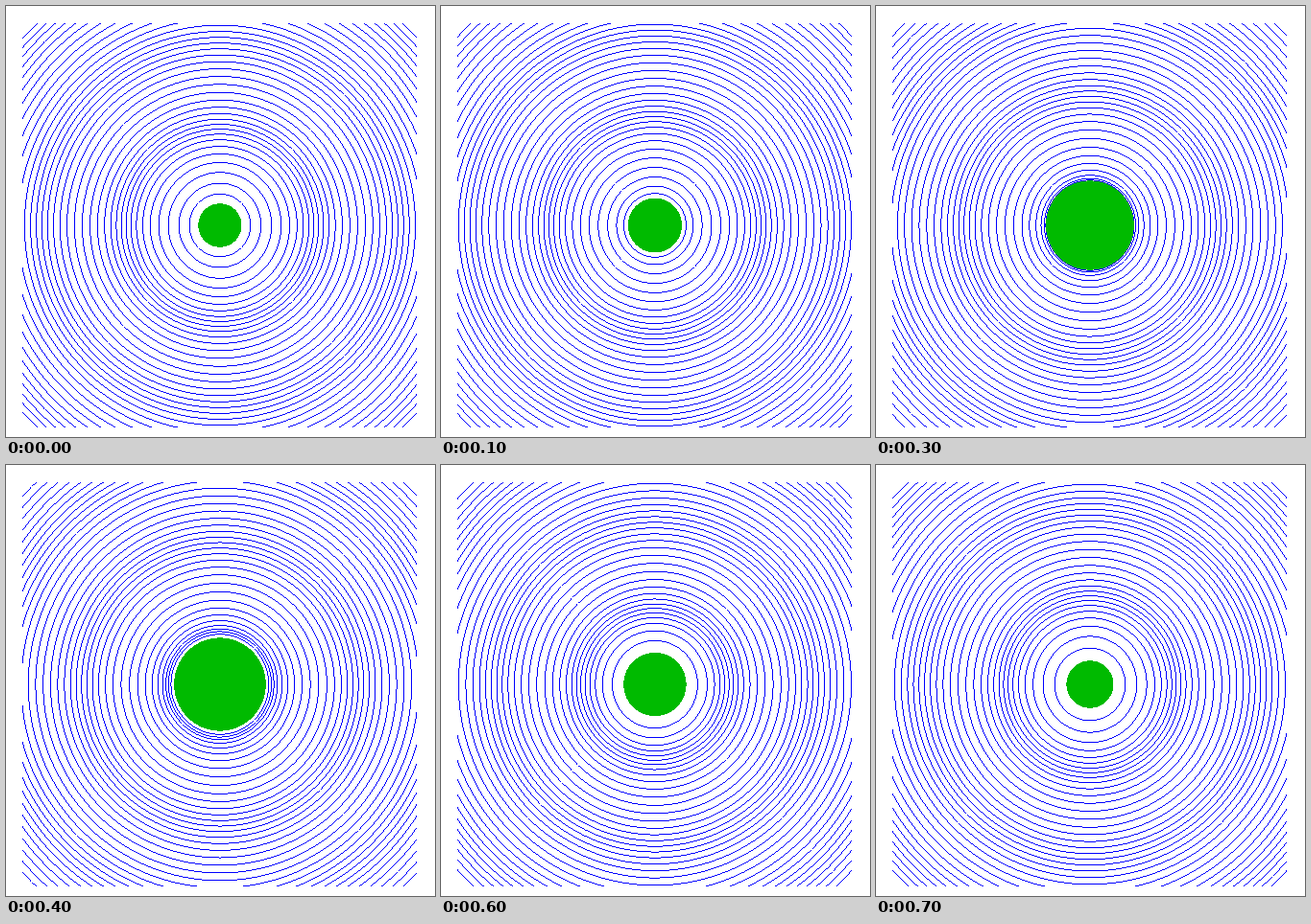
An HTML page with a canvas that plays this animation: 447x450 px, repeating every 0.8 s.

```html
<!DOCTYPE html>
<html lang="en">
<head>
<meta charset="utf-8">
<title>Waves around a pulsating sphere</title>
<style>
  html, body { margin: 0; width: 100%; height: 100%; overflow: hidden; background: #fff; }
  canvas { display: block; }
</style>
</head>
<body>
<canvas id="stage" width="447" height="450"></canvas>
<script>
const ctx = document.getElementById('stage').getContext('2d');
const STEPS = 8, STEP_MS = 100;
const CX = 222.4, CY = 228.5, ASPECT = 1.026;
const BOX = { left: 17, top: 18, right: 427, bottom: 439 };
const REST = 34.7, RINGS = 36, FIRST = 41.4, GAP = 6.83;
const rad = deg => deg * Math.PI / 180;

// Phase lag in degrees at rest radius a, slightly larger in the near field
function lag(a) {
  const near = (a - 58) / 14;
  return 168.2 + 4.15 * (a - REST) + 8 * Math.exp(-near * near);
}

// Amplitude falls off with distance, a little faster close to the sphere
const swing = a => 385 / a * (1 + 0.16 * (REST / a) ** 4);
const radius = (a, angle) => a + swing(a) * Math.cos(rad(angle - lag(a)));

function dot(x, y) {
  x = Math.round(x);
  y = Math.round(y);
  if (x >= BOX.left && x <= BOX.right && y >= BOX.top && y <= BOX.bottom) {
    ctx.fillRect(x, y, 1, 1);
  }
}

// One-pixel ellipse without smoothing: columns where flat, rows where steep
function ring(r) {
  const rx = r, ry = r * ASPECT, diag = Math.hypot(rx, ry);
  const xMax = rx * rx / diag, yMax = ry * ry / diag;
  for (let x = Math.ceil(CX - xMax); x <= CX + xMax; x++) {
    const h = ry * Math.sqrt(1 - ((x - CX) / rx) ** 2);
    dot(x, CY - h);
    dot(x, CY + h);
  }
  for (let y = Math.ceil(CY - yMax); y <= CY + yMax; y++) {
    const w = rx * Math.sqrt(1 - ((y - CY) / ry) ** 2);
    dot(CX - w, y);
    dot(CX + w, y);
  }
}

function disc(r) {
  const ry = r * ASPECT;
  for (let y = Math.ceil(CY - ry); y <= CY + ry; y++) {
    const w = r * Math.sqrt(1 - ((y - CY) / ry) ** 2);
    const x0 = Math.round(CX - w), x1 = Math.round(CX + w);
    ctx.fillRect(x0, y, x1 - x0 + 1, 1);
  }
}

function draw(step) {
  const angle = step * 360 / STEPS;
  ctx.fillStyle = '#fff';
  ctx.fillRect(0, 0, 447, 450);
  ctx.fillStyle = '#00f';
  for (let n = 0; n < RINGS; n++) ring(radius(FIRST + n * GAP, angle));
  ctx.fillStyle = '#00ba00';
  disc(radius(REST, angle));
}

let shown = 0;
const start = performance.now();
function tick() {
  const step = Math.floor((performance.now() - start) / STEP_MS) % STEPS;
  if (step !== shown) draw(shown = step);
  requestAnimationFrame(tick);
}
draw(0);
requestAnimationFrame(tick);
</script>
</body>
</html>
```
